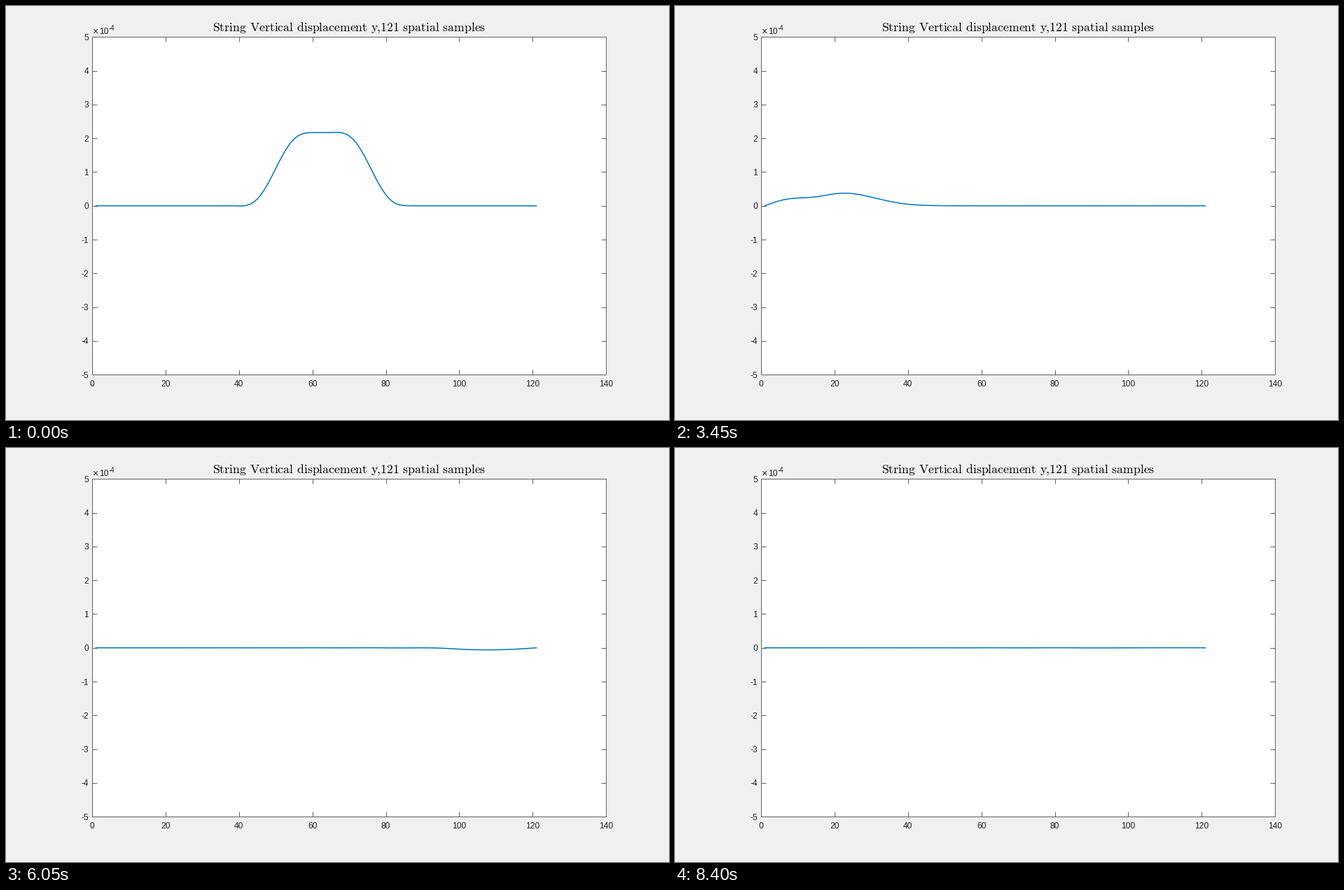
A matplotlib script for the animation above (8.45 s loop, 947x592 px).

```python
import numpy as np
import matplotlib.pyplot as plt
from matplotlib.animation import FuncAnimation

W, H, DPI = 947, 592, 64
PT = 72 / DPI  # points per pixel

plt.rcParams["font.family"] = "Liberation Sans"
plt.rcParams["mathtext.fontset"] = "cm"

# Struck string with fixed ends, as a sum of damped, dispersive modes
SAMPLES = 121
LENGTH = SAMPLES - 1
STRIKE = 13.05       # distance of the strike from the left end
HEIGHT = 2.17        # plateau height, in 1e-4
EDGE = 10            # half-width of the raised-cosine pulse edges
START = 62           # distance travelled at the first step
SPEED = 71.315       # samples travelled per step
DECAY = 0.0313       # loss per step
DAMPING = 0.012      # extra loss of short waves
DISPERSION = 0.00973

FRAMES, INTERVAL, HOLD = 169, 50, 10

pos = np.arange(SAMPLES)
modes = np.arange(1, SAMPLES)
wave = modes * np.pi / LENGTH
shapes = np.sin(np.outer(pos, wave))

a = wave * EDGE / np.pi
smooth = np.sinc(a) + (np.sinc(a - 1) + np.sinc(a + 1)) / 2
gain = 4 * HEIGHT / (modes * np.pi) * np.sin(wave * STRIKE) * smooth


def displacement(step):
    dist = START + SPEED * step
    phase = dist * (wave - DISPERSION * wave ** 3)
    loss = np.exp(-(DECAY + DAMPING * wave ** 2) * step)
    return shapes @ (gain * loss * np.sin(phase))


fig = plt.figure(figsize=(W / DPI, H / DPI), dpi=DPI, facecolor="#f0f0f0")

left, right, top, bottom = 123.1, 857.1, 44.2, 527.2
ax = fig.add_axes([left / W, 1 - bottom / H,
                   (right - left) / W, (bottom - top) / H])
ax.set_xlim(0, 140)
ax.set_ylim(-5, 5)
ax.set_xticks(range(0, 141, 20), [str(v) for v in range(0, 141, 20)])
ax.set_yticks(range(-5, 6), [str(v) for v in range(-5, 6)])
ax.tick_params(direction="in", top=True, right=True, length=7 * PT,
               width=PT, color="#606060", labelcolor="#202020",
               labelsize=12 * PT)
ax.tick_params(axis="x", pad=7.5 * PT)
ax.tick_params(axis="y", pad=5.2 * PT)
for spine in ax.spines.values():
    spine.set(linewidth=PT, color="#606060")


def label(x, y, text, size, **kw):
    fig.text(x / W, 1 - y / H, text, fontsize=size * PT,
             va="baseline", **kw)


label(123.5, 41, "×", 14, color="#202020")
label(133, 40.5, "10", 12, color="#202020")
label(147, 35, "-4", 9.6, color="#202020")

# The comma is kerned towards the y
title = "String Vertical displacement y,121 spatial samples"
title = title.replace(" ", r"\hspace{0.38}")
title = title.replace(",", r"\hspace{-0.095}{,}")
label(489.8, 36, rf"$\mathrm{{{title}}}$", 17.7, ha="center", color="black")

line, = ax.plot(pos + 1, displacement(0), color="#0072bd",
                linewidth=1.5 * PT, zorder=3)


def update(i):
    line.set_ydata(displacement(max(0, i - HOLD + 1)))
    return line,


anim = FuncAnimation(fig, update, frames=FRAMES, interval=INTERVAL,
                     repeat=True, repeat_delay=0)
plt.show()
```
